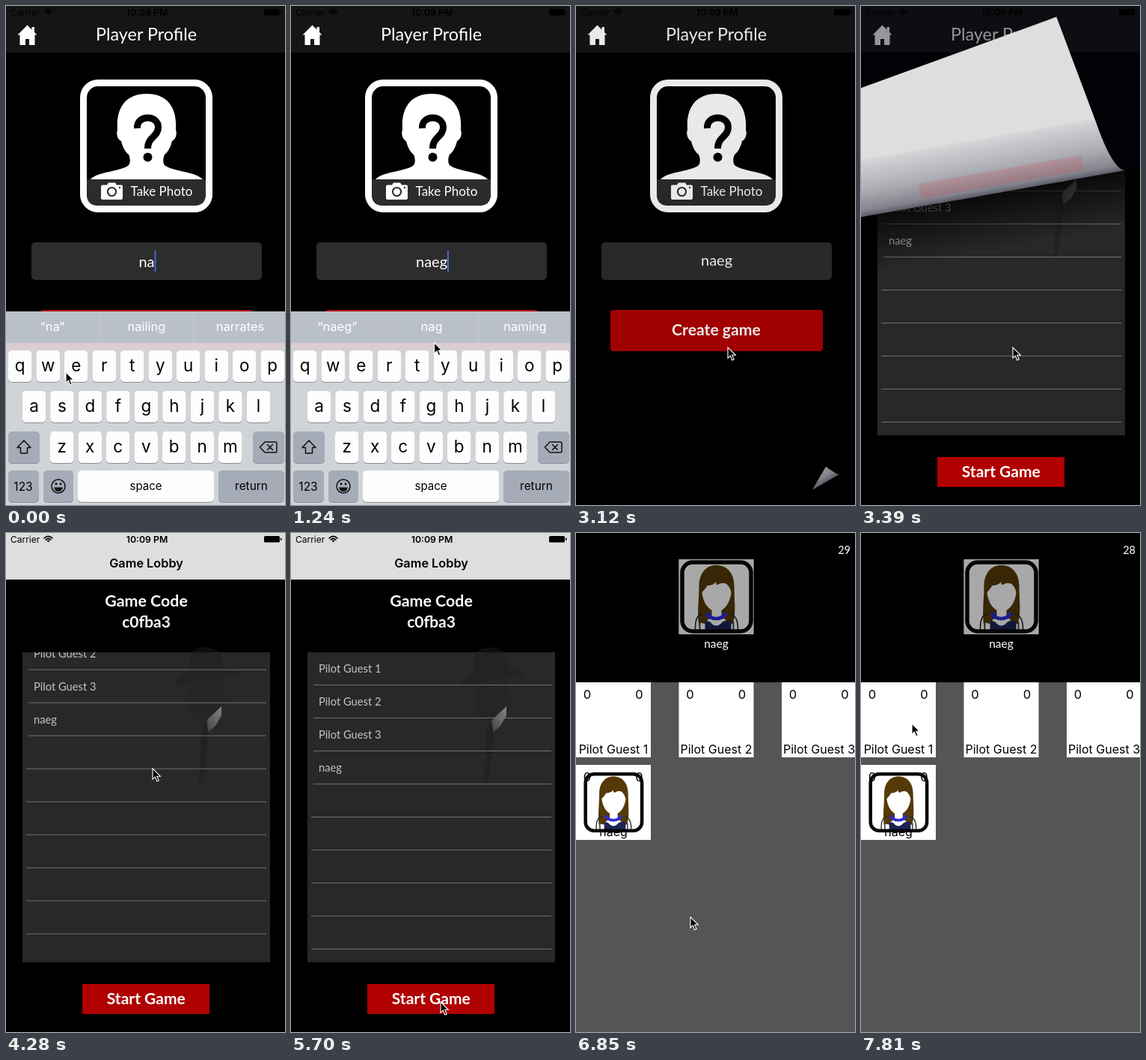
Animation, 373 px wide and 665 px high, one loop 7.99 s. Source, as an HTML page:

```html
<!DOCTYPE html>
<html lang="en">
<head>
<meta charset="utf-8">
<title>Player profile to game</title>
<style>
  html, body { margin: 0; width: 100%; height: 100%; overflow: hidden; background: #000; }
  svg { display: block; width: 373px; height: 665px; }
  text { font-family: Lato, "Open Sans", sans-serif; fill: #fff; text-anchor: middle; white-space: pre; }
  .ui { font-family: Inter, Roboto, sans-serif; fill: #000; }
  .start { text-anchor: start; }
  .end { text-anchor: end; }
  .bold { font-weight: 700; }
  .semi { font-weight: 600; }
  .light { font-weight: 400; fill: #fff; }
</style>
</head>
<body>
<svg id="stage" viewBox="0 0 373 665"></svg>
<script>
const LOOP = 7990;
const NAME = 'naeg';
const PLAYERS = ['Pilot Guest 1', 'Pilot Guest 2', 'Pilot Guest 3', NAME];
const RED = '#b00000';

const rect = (x, y, w, h, fill, r = 0, more = '') =>
  `<rect x="${x}" y="${y}" width="${w}" height="${h}" rx="${r}" fill="${fill}" ${more}/>`;
const text = (x, y, size, str, cls = '', more = '') =>
  `<text x="${x}" y="${y}" font-size="${size}" class="${cls}" ${more}>${str}</text>`;
const path = (d, fill, more = '') => `<path d="${d}" fill="${fill}" ${more}/>`;
const line = (d, color, width) =>
  path(d, 'none', `stroke="${color}" stroke-width="${width}" stroke-linecap="round" stroke-linejoin="round"`);

function keyCap(x, y, w, fill = '#fdfdfd') {
  return rect(x, y + 1, w, 42, '#8b8f95', 5) + rect(x, y, w, 42, fill, 5);
}

function keyRow(letters, x, y) {
  return [...letters].map((c, i) => {
    const kx = x + i * 37.5;
    return keyCap(kx, y, 31.5) + text(kx + 15.75, y + 28, 22.5, c, 'ui');
  }).join('');
}

function keyboard() {
  const grey = '#a5acb8';
  return rect(0, 407, 373, 258, '#d0d4d9') +
    rect(0, 449, 373, 26, 'url(#blush)') +
    rect(0, 407, 373, 42, '#b9c0ca') +
    rect(124, 407, 1, 42, '#cbc6cd') + rect(250, 407, 1, 42, '#cbc6cd') +
    [62, 188, 313].map((x, i) => text(x, 433, 16.5, '', 'ui light', `id="hint${i}"`)).join('') +
    keyRow('qwertyuiop', 3, 459) + keyRow('asdfghjkl', 21.7, 513) + keyRow('zxcvbnm', 59, 567) +
    keyCap(3, 567, 42, grey) + keyCap(330, 567, 42, grey) +
    keyCap(3, 619, 41, grey) + keyCap(50, 619, 40, grey) +
    keyCap(96, 619, 182) + keyCap(284, 619, 88, grey) +
    line('M24 579 L33 588.5 H28.5 V596 H19.5 V588.5 H15 Z', '#111', 1.5) +
    line('M346 581 H360 Q362 581 362 583 V593 Q362 595 360 595 H346 L339.5 588 Z M349.5 584.5 L356.5 591.5 M356.5 584.5 L349.5 591.5', '#111', 1.5) +
    text(23, 645.5, 15.5, '123', 'ui') + text(187, 645, 15, 'space', 'ui') + text(328, 645, 15.4, 'return', 'ui') +
    '<circle cx="70" cy="640" r="9" fill="none" stroke="#111" stroke-width="1.5"/>' +
    '<circle cx="67" cy="637" r="1.4"/><circle cx="73" cy="637" r="1.4"/>' +
    path('M64 641.5 H76 Q74.5 647 70 647 Q65.5 647 64 641.5 Z', '#111');
}

function profile() {
  return rect(0, 0, 373, 665, '#000') + rect(0, 0, 373, 62, '#151515') +
    path('M28.5 25.5 L15.5 38.5 H18.5 V52 H26 V44 H31 V52 H38.5 V38.5 H41.5 L38 35 V28 H34.5 V31.5 Z', '#fff') +
    text(187.5, 46, 23.4, 'Player Profile') +
    rect(99, 98, 177, 177, '#fff', 24) + rect(108, 107, 159, 159, '#000', 15) +
    path('M113 231 C122 221 150 221 163 213 C167 210 166 202 164 198 C159 194 156 188 154 180 C149 178 147 170 149 165 C147 138 158 117 188 117 C218 117 229 138 227 165 C229 170 227 178 222 180 C220 188 217 194 212 198 C210 202 209 210 213 213 C226 221 254 221 263 231 Z', '#fff') +
    path('M175.5 163 C174 144.500 204 144.500 203.500 162 C203 175 189.500 174 189.500 190', 'none', 'stroke="#000" stroke-width="9"') +
    '<circle cx="189.500" cy="201.500" r="6"/>' +
    path('M108 231 H267 V251 Q267 266 252 266 H123 Q108 266 108 251 Z', '#2c2c2c') +
    path('M129 238.500 H135 L137 235.500 H146 L148 238.500 H154 Q156 238.500 156 240.500 V256 Q156 258 154 258 H129 Q127 258 127 256 V240.500 Q127 238.500 129 238.500 Z', '#fff') +
    '<circle cx="141.500" cy="247.500" r="5.600" fill="#fff" stroke="#2c2c2c" stroke-width="2"/><circle cx="152" cy="242" r="1.200" fill="#2c2c2c"/>' +
    text(208, 252.5, 17, 'Take Photo') +
    rect(34, 315, 308, 50, '#2d2d2d', 5) +
    text(188, 346, 20, '', '', 'id="field"') + rect(197, 326, 1.8, 28, '#4570e6', 0, 'id="caret"') +
    rect(46, 405, 284, 55, RED, 4) + text(187.5, 439, 21.2, 'Create game', 'bold') +
    `<g id="keys">${keyboard()}</g>` +
    rect(0, 0, 373, 665, '#02060c', 0, 'id="dim" opacity="0"');
}

function lobby() {
  let rows = '';
  for (let i = 0; i < 12; i++) {
    const y = 202 + 44 * i, x = i < 4 ? 30 : 27;
    rows += rect(x, y, 348 - x, 1, '#707070');
    if (PLAYERS[i]) rows += text(37, y - 16, 14.7, PLAYERS[i], 'start', 'style="fill:#c4c4c4"');
  }
  return rect(0, 0, 373, 665, '#000') + rect(0, 0, 373, 62, '#dedede') +
    text(187.5, 46, 16.3, 'Game Lobby', 'ui semi') +
    text(187.5, 98, 21.4, 'Game Code', 'bold') + text(187.5, 126, 21, 'c0fba3', 'bold') +
    path('M246 160 Q262 145 287 159 Z', '#0e0e0e') +
    rect(22, 159, 331, 413, '#282828') +
    path('M247 159 H287 L292 180 Q312 184 311 189 Q270 198 224 205 Q228 192 243 186 Z', '#232323') +
    path('M246 204 L290 196 L294 228 L262 252 L246 240 Z', '#252525') +
    path('M261 267 L270 248 L288 231 L288 243 L280 257 L266 269 Z', 'url(#shirt)') +
    path('M261 267 L268 249 L271 268 L264 330 L258 335 Z', '#222') +
    `<g clip-path="url(#listClip)"><g id="rows">${rows}</g></g>` +
    rect(102, 601, 170, 40, RED) + text(187.3, 628, 21, 'Start Game', 'bold', 'id="startText"');
}

// Portrait in a 100 by 100 box
function avatar() {
  let beads = '';
  for (let i = 0; i < 9; i++) {
    const a = Math.PI * (0.08 + 0.105 * i);
    beads += `<circle cx="${50 + 12 * Math.cos(a)}" cy="${71 + 8 * Math.sin(a)}" r="2.600" fill="#2b2bdc"/>`;
  }
  return rect(4.5, 4, 92, 92, '#fff', 14) +
    path('M27 92 C24 70 27 54 27 36 C27 18 37 8 50 8 C64 8 74 18 74 36 C74 54 77 74 72 86 C62 88 38 88 27 84 Z', '#553908') +
    path('M31 44 Q36 39 38 35 Q46 35 50 30 Q49 34 52 34 Q58 30 64 33 Q69 38 70 44 C69 55 64 64 57 68 V76 L66 84 Q50 92 35 84 L44 76 V68 C37 64 32 55 31 44 Z', '#fff') +
    path('M35 82 Q42 82 44 86 Q50 91 56 86 Q60 80 70 82 V94 H35 Z', '#1c2456') +
    line('M31 73 C23 75 22 83 22 93 M69 73 C77 75 79 83 79 93 M28 84 V93 M73 84 V93', '#222', 1.6) + beads +
    '<rect x="4.500" y="4" width="92" height="92" rx="14" fill="none" stroke="#080808" stroke-width="5.500"/>';
}

function game() {
  const cells = PLAYERS.map((name, i) => {
    const x = (i % 3) * 137.5, y = i < 3 ? 199 : 309;
    return rect(x, y, 100, 100, '#fff') +
      (i === 3 ? `<g transform="translate(${x + 9} ${y + 9}) scale(.82)">${avatar()}</g>` : '') +
      text(x + 15, y + 21.5, 16.5, '0', 'ui') + text(x + 84.5, y + 22, 16.5, '0', 'ui') +
      text(x + 50, y + 95, 16, name, 'ui');
  }).join('');
  return rect(0, 0, 373, 700, '#555') + rect(0, 0, 373, 199, '#000') +
    `<g transform="translate(137.500 35)">${rect(0, 0, 100, 100, '#fff')}${avatar()}${rect(0, 0, 100, 100, '#000', 0, 'opacity=".34"')}</g>` +
    text(187.5, 153, 15.5, NAME) + text(367, 28, 14.5, '', 'end', 'id="timer"') +
    `<g id="cells">${cells}</g>`;
}

const status = text(6, 12.5, 12, 'Carrier', 'ui start') + text(188.5, 12.5, 12.3, '10:09 PM', 'ui semi') +
  line('M51 6.800 Q56.500 1.800 62 6.800 M53.200 9 Q56.500 6 59.800 9', '#000', 1.7) + path('M54.600 10.300 Q56.500 8.800 58.400 10.300 L56.500 12.500 Z', '#000') +
  rect(345, 4, 21, 8.5, '#000', 1.5) + rect(367, 6.5, 1.5, 3.5, '#000', .7);

document.getElementById('stage').innerHTML = `
  <defs>
    <linearGradient id="blush" x2="0" y2="1"><stop stop-color="#dccdd1"/><stop offset="1" stop-color="#d0d4d9"/></linearGradient>
    <linearGradient id="shirt" x1="1" x2="0" y2="1"><stop stop-color="#858585"/><stop offset="1" stop-color="#333"/></linearGradient>
    <linearGradient id="roll" gradientUnits="userSpaceOnUse" x1="0" y1="0" x2="0" y2="-76">
      <stop stop-color="#5d5d69"/><stop offset=".1" stop-color="#83838d"/><stop offset=".45" stop-color="#adadb4"/>
      <stop offset=".95" stop-color="#d2d3d5"/><stop offset="1" stop-color="#dedede"/>
    </linearGradient>
    <linearGradient id="shade" x2="0" y2="1"><stop stop-color="#000" stop-opacity=".75"/><stop offset="1" stop-color="#000" stop-opacity="0"/></linearGradient>
    <clipPath id="listClip">${rect(22, 159, 331, 413, '#000')}</clipPath>
    <clipPath id="flat">${rect(-1500, -3000, 3000, 3000, '#000', 0, 'id="flatEdge"')}</clipPath>
  </defs>
  <g id="lobby">${lobby()}</g>
  <g id="profile">${profile()}</g>
  <g id="curl">
    ${rect(-1500, 0, 3000, 75, 'url(#shade)')}
    ${path('', 'url(#roll)', 'id="back"')}
    ${rect(-275, -30, 221, 20, '#d4404a', 0, 'id="ghost"')}
  </g>
  <g id="game">${game()}</g>
  ${status}
  <g id="cursor">${path('M0 0 V14.200 L3.300 11.200 L5.800 17 L8.200 16 L5.700 10.300 H10.300 Z', '#000', 'stroke="#fff" stroke-width="1.100"')}</g>`;

const el = {};
document.querySelectorAll('[id]').forEach(e => { el[e.id] = e; });

const show = (e, on) => e.setAttribute('display', on ? 'inline' : 'none');
const move = (e, x, y) => e.setAttribute('transform', `translate(${x} ${y})`);

// Linear steps: each entry is [time, ...values]
function along(steps, t) {
  let i = 0;
  while (i < steps.length - 2 && t > steps[i + 1][0]) i++;
  const [a, b] = [steps[i], steps[i + 1]];
  const k = Math.min(1, Math.max(0, (t - a[0]) / (b[0] - a[0])));
  return a.slice(1).map((v, j) => v + (b[j + 1] - v) * k);
}
// Last entry whose time has passed
const at = (steps, t) => steps.filter(s => s[0] <= t).pop()[1];
// Share of the way left for a critically damped spring
const spring = (dt, w = 0.0183) => dt <= 0 ? 1 : (1 + w * dt) * Math.exp(-w * dt);

const POINTER = [
  [0, 80, 488], [180, 85, 489], [330, 85, 489], [600, 194, 537], [740, 194, 536], [880, 193, 489],
  [1680, 190, 400], [1900, 190, 387], [2250, 190, 387], [2490, 203, 455], [3880, 203, 455],
  [4280, 196, 314], [4400, 195, 303], [4640, 199, 612], [4990, 200, 625], [6400, 200, 625],
  [6670, 170, 564], [7550, 87, 310], [7810, 68, 254]
];
const TYPED = [[0, 'na'], [270, 'nae'], [720, NAME]];
const HINTS = [
  [0, ['“na”', 'nailing', 'narrates']], [290, ['“nae”', 'name', 'near']],
  [740, ['“naeg”', 'nag', 'naming']], [1500, ['is', 'I', 'to']]
];
const CARET = [[0, 1], [1250, 0], [1600, 1], [2034, 0]];
const FOLD = [[3050, 720, -38], [3120, 625, -30], [3390, 220, -10], [3780, -150, -3]];
const PRESS = [[5210, 1], [5250, .3], [5400, .3], [5700, 1]];
const COUNT = [[0, ''], [6490, '29'], [7490, '28']];
const RELEASE = 4400;

function drawProfile(t) {
  const editing = t < 2034;
  el.field.textContent = at(TYPED, t);
  el.field.setAttribute('y', editing ? 347.5 : 346);
  show(el.caret, at(CARET, t));
  el.caret.setAttribute('x', 188 + el.field.getComputedTextLength() / 2);
  at(HINTS, t).forEach((s, i) => { el['hint' + i].textContent = s; });
  move(el.keys, 0, 258 * (1 - spring(t - 2034)));
}

function drawCurl(t) {
  const on = t >= 3050 && t < 3780;
  show(el.curl, on);
  show(el.profile, t < 3780);
  if (!on) {
    el.profile.removeAttribute('clip-path');
    el.dim.setAttribute('opacity', 0);
    return;
  }
  const [y, deg] = along(FOLD, t);
  const place = `translate(353 ${y}) rotate(${deg})`;
  el.curl.setAttribute('transform', place);
  el.flatEdge.setAttribute('transform', place);
  el.profile.setAttribute('clip-path', 'url(#flat)');
  el.dim.setAttribute('opacity', along([[3050, 0], [3390, .42]], t)[0]);

  const a = deg * Math.PI / 180, len = Math.max(0, 665 - y) * .495;
  const cx = len * (Math.sin(a) - .075), cy = -len * Math.cos(a);
  const left = cx + cy / Math.tan(-a);
  el.back.setAttribute('d',
    `M0 0 Q${cx * .3} ${cy * .02} ${cx * .5} ${cy * .33} L${cx} ${cy} L${left} 0 Z`);
  el.ghost.setAttribute('opacity', along([[3300, 0], [3390, .2]], t)[0] * (t < 3480));
}

function scrollAt(t) {
  const pulled = Math.max(0, 455 - along(POINTER, Math.min(t, RELEASE))[1]);
  const band = 413 * (1 - 1 / (pulled * .54 / 413 + 1));
  return band * spring(t - RELEASE, .016);
}

function draw(t) {
  if (t < 3780) drawProfile(t);
  drawCurl(t);
  move(el.rows, 0, t > 3880 ? -scrollAt(t) : 0);
  el.startText.setAttribute('opacity', along(PRESS, t)[0]);
  show(el.game, t >= 5798);
  move(el.game, 0, 665 * spring(t - 5798));
  el.timer.textContent = at(COUNT, t);
  show(el.cells, t >= 6850);
  move(el.cursor, ...along(POINTER, t));
}

const begin = performance.now();
function tick() {
  draw((performance.now() - begin) % LOOP);
  requestAnimationFrame(tick);
}
tick();
</script>
</body>
</html>
```
